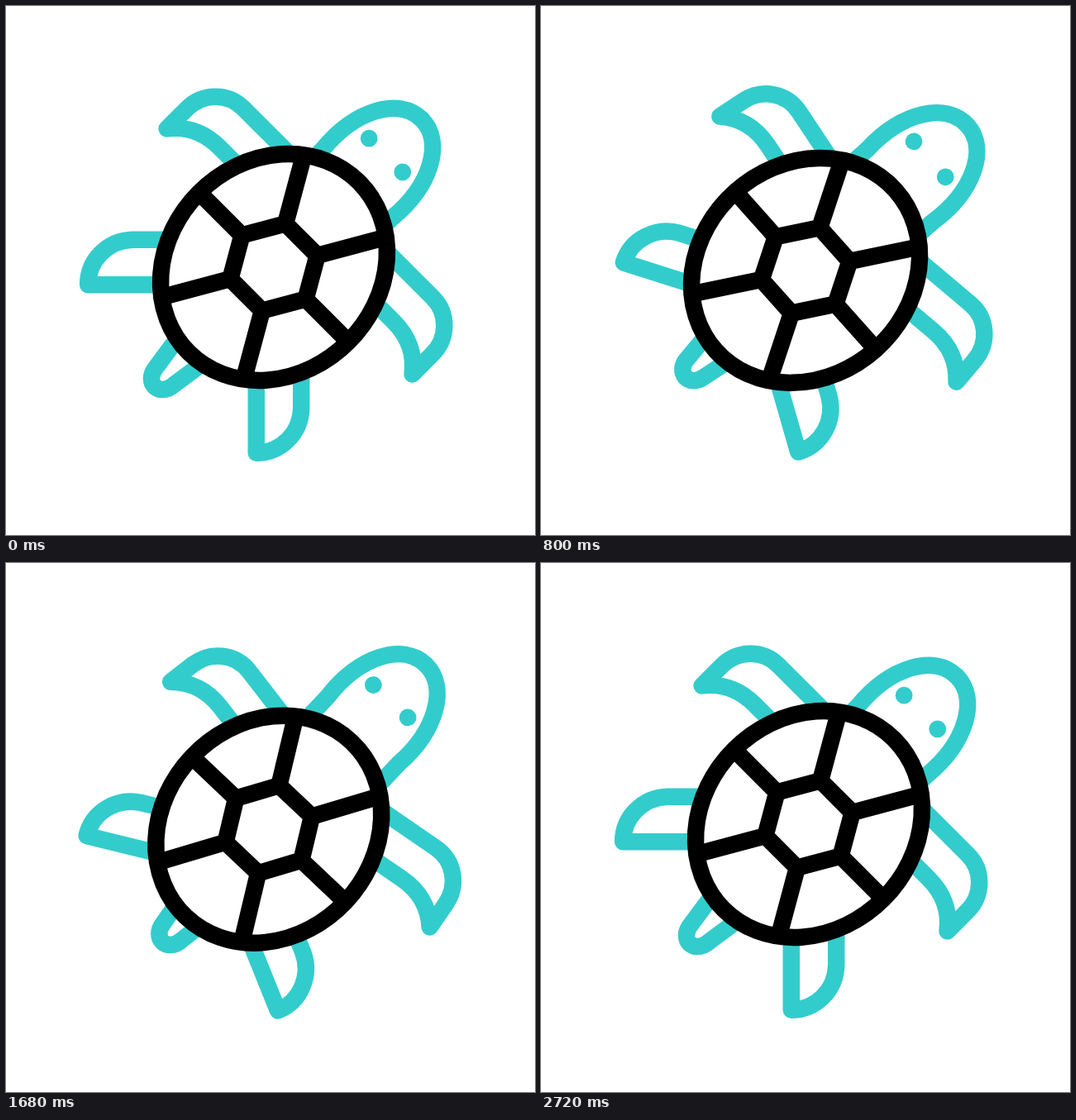
Animation of 640 by 640 pixels, one loop 3 s. Source, as an HTML page with a canvas:

```html
<!DOCTYPE html>
<html lang="en">
<head>
<meta charset="utf-8">
<title>Swimming turtle</title>
<style>
  html, body { margin: 0; height: 100%; overflow: hidden; background: #fff; }
  canvas { display: block; width: 100vw; height: 100vh; }
</style>
</head>
<body>
<canvas width="640" height="640"></canvas>
<script>
const ctx = document.querySelector('canvas').getContext('2d');
const LOOP = 3000, STEP = 40, START = 200, END = 2720;
const SKIN = '#33cccc', SHELL = '#000';
const SIDES = [1, -1], RAD = Math.PI / 180;

// Swings between [time, value] extremes with sine easing, from rest to rest.
function swing(...extremes) {
  const keys = [[START, 0], ...extremes, [END, 0]];
  return t => {
    const i = Math.max(1, keys.findIndex(([time]) => time >= t));
    const [t0, v0] = keys[i - 1], [t1, v1] = keys[i];
    return v0 + (v1 - v0) * (1 - Math.cos(Math.PI * (t - t0) / (t1 - t0))) / 2;
  };
}

// Travel along the diagonal, in px on each axis
const shellMove = swing([600, -24.5], [1020, 20], [1650, -6.5], [2080, 18]);
const headMove = swing([600, -12], [1060, 26], [1560, 7.5], [2080, 24]);
const tailMove = swing([600, -11], [1020, 19], [1650, 5.5], [2080, 17]);
const turn = swing([780, 3.3], [1420, -2.8], [2120, 1.2]);
// 1 reaches forward, -1 is swept back
const paddle = swing([320, 0], [740, 1], [1260, -1], [1700, 1], [2080, -1]);
const effort = swing([760, 1], [2080, 1]);

// Left halves, with the turtle facing up and its shell centred on 0,0
const headHalf = new Path2D('M-59-95V-143C-65-205-38-253 0-253');
const tailHalf = new Path2D('M-27 106L-15 187C-14 198-7 204 0 204');
const front = {
  path: new Path2D('M-70-110H-162C-189-110-210-88-210-61V-27C-193-49-172-56-149-56H-85'),
  pivot: [-99, -106], reach: 13, bias: -4, lean: 0, slide: 7
};
const back = {
  path: new Path2D('M-91 44L-144 97C-165 119-165 153-144 174L-52 82'),
  pivot: [-100, 109], reach: 18, bias: 0, lean: 2.5, slide: 0
};

// Paints with the body's axis pointing up, moved along that axis.
function place(move, angle, paint) {
  ctx.save();
  ctx.translate(324 + move, 316 - move);
  ctx.rotate((45 + angle) * RAD);
  paint();
  ctx.restore();
}

function bothSides(paint) {
  for (const side of SIDES) {
    ctx.save();
    ctx.scale(side, 1);
    paint(side);
    ctx.restore();
  }
}

function drawLimb({ path, pivot: [x, y], reach, bias, lean, slide }, t) {
  const work = effort(t);
  bothSides(side => {
    ctx.translate(x + (5 + side * slide) * work, y - 3 * work);
    ctx.rotate((reach * paddle(t) + (bias - side * lean) * work) * RAD);
    ctx.translate(-x, -y);
    ctx.stroke(path);
  });
}

function drawHead() {
  bothSides(() => {
    ctx.stroke(headHalf);
    ctx.beginPath();
    ctx.arc(-28.7, -191.6, 10.4, 0, 7);
    ctx.fill();
  });
}

function drawShell() {
  ctx.beginPath();
  ctx.ellipse(0, 0, 127.7, 145.7, 0, 0, 7);
  ctx.fillStyle = '#fff';
  ctx.fill();
  ctx.stroke();

  const corners = Array.from({ length: 6 }, (_, i) =>
    [Math.cos(i * 60 * RAD), Math.sin(i * 60 * RAD)]);
  ctx.beginPath();
  for (const [x, y] of corners) ctx.lineTo(x * 54.5, y * 54.5);
  ctx.closePath();
  for (const [x, y] of corners) {
    ctx.moveTo(x * 54.5, y * 54.5);
    ctx.lineTo(x * 135, y * 135);
  }
  ctx.stroke();
}

function draw(now) {
  const step = Math.floor(now % LOOP / STEP) * STEP;
  const t = Math.min(END, Math.max(START, step));
  const angle = turn(t);
  ctx.clearRect(0, 0, 640, 640);
  ctx.lineWidth = 20.5;
  ctx.lineJoin = ctx.lineCap = 'round';
  ctx.strokeStyle = ctx.fillStyle = SKIN;
  place(tailMove(t), angle, () => bothSides(() => ctx.stroke(tailHalf)));
  place(headMove(t), angle, drawHead);
  place(shellMove(t), angle, () => {
    drawLimb(front, t);
    drawLimb(back, t);
    ctx.strokeStyle = SHELL;
    ctx.lineJoin = 'miter';
    ctx.lineCap = 'butt';
    drawShell();
  });
  requestAnimationFrame(draw);
}
requestAnimationFrame(draw);
</script>
</body>
</html>
```
